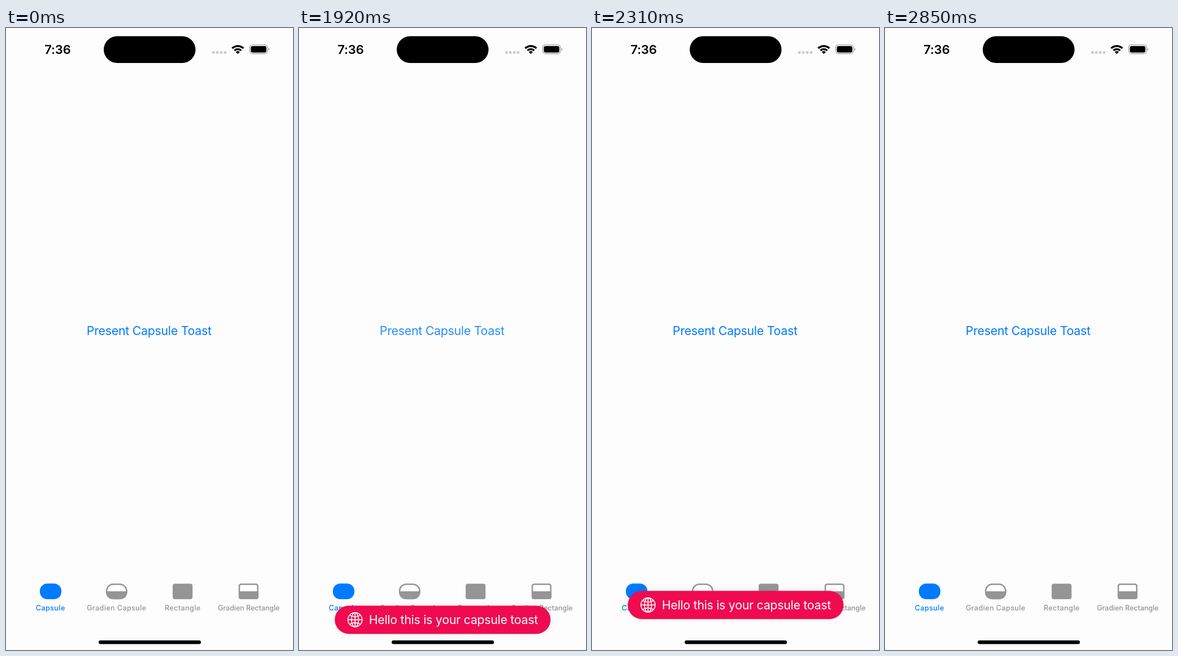
Write an HTML page that moves like this. It is 508 by 1102 pixels and loops after 2910 ms.

```html
<!DOCTYPE html>
<html lang="en">
<head>
<meta charset="utf-8">
<title>Capsule toast</title>
<style>
  html, body { margin: 0; width: 100%; height: 100%; overflow: hidden; background: #fdfdfd; }
  svg { display: block; width: 100%; height: 100%; font-family: Inter, sans-serif; }
  .body { font-size: 21.3px; letter-spacing: -.25px; }
  .tabs text { font-size: 12.6px; font-weight: 500; letter-spacing: .4px; }
  .tabs .tight { letter-spacing: -.08px; }
  .tabs .on { fill: #007aff; }
  .toast { filter: drop-shadow(0 0 6px rgba(0, 0, 0, .08)); }
  .line { fill: none; stroke: currentColor; }
</style>
</head>
<body>
<svg viewBox="0 0 508 1102">
  <!-- Status bar -->
  <text x="68.3" y="46" font-size="22" font-weight="600" letter-spacing="-.2">7:36</text>
  <rect x="173" y="14.5" width="162.5" height="47.5" rx="23.75"/>
  <g fill="#cacaca">
    <rect x="364.8" y="41" width="4.8" height="4.8" rx="1.8"/>
    <rect x="371.6" y="41" width="4.8" height="4.8" rx="1.8"/>
    <rect x="378.5" y="41" width="4.8" height="4.8" rx="1.8"/>
    <rect x="385.4" y="41" width="4.8" height="4.8" rx="1.8"/>
  </g>
  <g transform="translate(410.3 46)">
    <path class="line" stroke-width="3.4" d="M-9.9-10a14.1 14.1 0 0 1 19.8 0M-6-6.1a8.6 8.6 0 0 1 12 0"/>
    <path d="M0 0L-3.6-3.6a5.1 5.1 0 0 1 7.2 0z"/>
  </g>
  <rect x="431.4" y="29.9" width="31.4" height="15.6" rx="4.8" fill="none" stroke="#a0a0a0" stroke-width="1.3"/>
  <rect x="433.4" y="31.9" width="27.4" height="11.6" rx="3.2"/>
  <path d="M464.4 35.2q1.8.7 1.8 2.5t-1.8 2.5z" fill="#a0a0a0"/>

  <text id="button" class="body" x="142.8" y="544" fill="#007aff">Present Capsule Toast</text>

  <g class="tabs" fill="#959595" color="#959595">
    <rect class="on" x="60" y="984.3" width="38" height="27.8" rx="13"/>
    <text class="on" x="52.8" y="1032">Capsule</text>

    <rect class="line" x="178.1" y="985.5" width="35.4" height="25.4" rx="11.8" stroke-width="2.5"/>
    <path d="M177 998h37.6c0 9-5 14.1-13 14.1h-11.6c-8 0-13-5.1-13-14.1z"/>
    <text x="142.9" y="1032">Gradien Capsule</text>

    <rect x="295" y="984.4" width="35.2" height="27.6" rx="4"/>
    <text x="280.9" y="1032">Rectangle</text>

    <rect class="line" x="413" y="985.6" width="32.6" height="25.2" rx="3" stroke-width="2.5"/>
    <path d="M412 998h34.8v10q0 4-4 4h-26.8q-4 0-4-4z"/>
    <text class="tight" x="375" y="1032">Gradien Rectangle</text>
  </g>

  <g id="toast" class="toast" color="#fff" visibility="hidden">
    <rect x="63.3" y="-25" width="382" height="50" rx="25" fill="#f00a50"/>
    <g class="line" transform="translate(99.2 0)" stroke-width="1.6">
      <circle r="12.6"/>
      <ellipse rx="6.3" ry="12.6"/>
      <path d="M0-12.6V12.6M-12.6 0H12.6M-9.6-8Q0-2.4 9.6-8M-9.6 8Q0 2.4 9.6 8"/>
    </g>
    <text class="body" x="123.7" y="7.6" fill="#fff">Hello this is your capsule toast</text>
  </g>

  <rect x="164" y="1085" width="181" height="6.5" rx="3.25"/>
</svg>
<script>
const LOOP = 2910, STEP = 30;
const PRESS = 1650, RELEASE = 1725, FADE = 350;
const ENTER = 1690, SHOWN = 1740, LEAVE = 2678, GONE = 2850;
const REST = 1023, TRAVEL = 144;

const button = document.getElementById('button');
const toast = document.getElementById('toast');

// Remaining distance (1 to 0) of a damped spring, ms after its start.
function spring(ms, response = .55, damping = .825) {
  const t = ms / 1000, w = 2 * Math.PI / response;
  const decay = w * damping, wd = w * Math.sqrt(1 - damping * damping);
  return Math.exp(-decay * t) * (Math.cos(wd * t) + decay / wd * Math.sin(wd * t));
}

function buttonOpacity(t) {
  if (t < PRESS) return 1;
  const p = Math.min(1, Math.max(0, (t - RELEASE) / FADE));
  return t < SHOWN ? .23 : 1 - .77 * (1 - p) ** 2;
}

function toastY(t) {
  const offset = t < LEAVE ? spring(t - ENTER) : 1 - spring(t - LEAVE);
  return REST + TRAVEL * offset;
}

function draw(t) {
  button.setAttribute('opacity', buttonOpacity(t));
  const visible = t >= SHOWN && t < GONE;
  toast.setAttribute('visibility', visible ? 'visible' : 'hidden');
  if (visible) toast.setAttribute('transform', `translate(0 ${toastY(t).toFixed(2)})`);
}

let start;
function tick(now) {
  start ??= now;
  const t = (now - start) % LOOP;
  draw(Math.floor(t / STEP) * STEP);
  requestAnimationFrame(tick);
}
draw(0);
requestAnimationFrame(tick);
</script>
</body>
</html>
```
